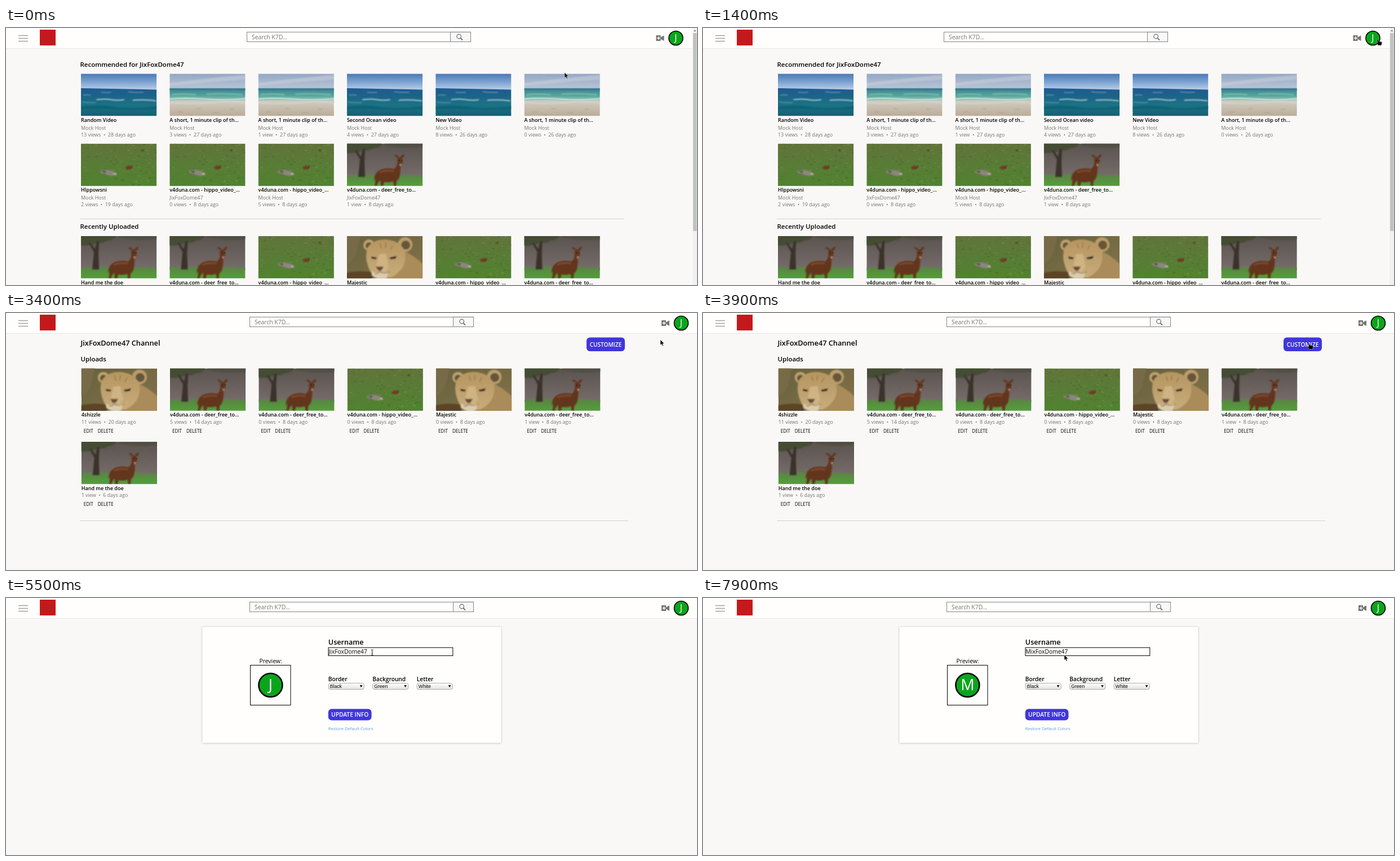
An HTML page for the animation above (8000 ms loop, 1226x457 px).

```html
<!DOCTYPE html>
<html lang="en">
<head>
<meta charset="utf-8">
<title>Video site account demo</title>
<style>
html, body { margin: 0; width: 100%; height: 100%; overflow: hidden; background: #f9f8f7; }
svg { display: block; }
text { font-family: "Open Sans", "Noto Sans", sans-serif; white-space: pre; }
.b { font-weight: 600; }
.m { text-anchor: middle; }
.g { fill: #747474; }
.sel { font-family: "Liberation Sans", Arial, sans-serif; }
.blur { filter: url(#blur); }
</style>
</head>
<body>
<svg id="stage" width="1226" height="457" viewBox="0 0 1226 457">
<defs>
  <linearGradient id="sky" x2="0" y2="1"><stop stop-color="#4a78b8"/><stop offset=".6" stop-color="#85a9d6"/><stop offset="1" stop-color="#b9cde4"/></linearGradient>
  <linearGradient id="sea" x2="0" y2="1"><stop stop-color="#1f5a93"/><stop offset=".25" stop-color="#1c6288"/><stop offset=".6" stop-color="#1c7285"/><stop offset="1" stop-color="#155f72"/></linearGradient>
  <linearGradient id="haze" x2="0" y2="1"><stop stop-color="#93a7c6"/><stop offset="1" stop-color="#bcc7d6"/></linearGradient>
  <linearGradient id="surf" x2="0" y2="1"><stop stop-color="#3d8390"/><stop offset=".5" stop-color="#4fa398"/><stop offset="1" stop-color="#a9cabd"/></linearGradient>
  <linearGradient id="sand" x2="0" y2="1"><stop stop-color="#d2cdc3"/><stop offset="1" stop-color="#bbac98"/></linearGradient>
  <linearGradient id="lawn" x2="0" y2="1"><stop stop-color="#61733a"/><stop offset=".5" stop-color="#587c36"/><stop offset="1" stop-color="#50832f"/></linearGradient>
  <linearGradient id="mist" x2="0" y2="1"><stop stop-color="#5a534e"/><stop offset="1" stop-color="#776d6c"/></linearGradient>
  <linearGradient id="turf" x2="0" y2="1"><stop stop-color="#5d8048"/><stop offset="1" stop-color="#52a038"/></linearGradient>
  <linearGradient id="scrub" x2="1" y2="1"><stop stop-color="#65613d"/><stop offset="1" stop-color="#84734b"/></linearGradient>
  <linearGradient id="fur" x2="0" y2="1"><stop stop-color="#b6955f"/><stop offset="1" stop-color="#c8ad7c"/></linearGradient>
  <linearGradient id="pick" x2="0" y2="1"><stop stop-color="#fff"/><stop offset="1" stop-color="#e2e2e2"/></linearGradient>
  <filter id="blur"><feGaussianBlur stdDeviation=".8"/></filter>
  <filter id="soft" x="-10%" y="-20%" width="120%" height="150%"><feDropShadow dx="0" dy="1" stdDeviation="1.6" flood-opacity=".4"/></filter>
  <filter id="glow" x="-5%" y="-5%" width="110%" height="112%"><feDropShadow dx="0" dy=".3" stdDeviation="1.4" flood-opacity=".35"/></filter>

  <symbol id="ocean" viewBox="0 0 134 75">
    <rect width="134" height="28" fill="url(#sky)"/>
    <path d="M0 25.5L134 28V75H0Z" fill="url(#sea)"/>
    <g class="blur">
      <path d="M-4 59q34-6 64 0t78-2v5q-40 3-78 1t-64 0Z" fill="#0d566b" opacity=".45"/>
      <g fill="none" stroke="#d3e4ea" stroke-linecap="round">
        <path d="M36 33q9 1 17 0M84 32q12 2 26 1M4 38q8-1 13 0" stroke-width=".9" opacity=".7"/>
        <path d="M28 46q14-2 26 0t22 0M92 47q18-2 40 1" stroke-width="1.5"/>
        <path d="M2 50q12 2 24 1" opacity=".5"/>
      </g>
    </g>
  </symbol>

  <symbol id="beach" viewBox="0 0 134 75">
    <rect width="134" height="28" fill="url(#haze)"/>
    <rect y="26" width="134" height="24" fill="url(#surf)"/>
    <path d="M0 48q30-2 64 0t70-1V75H0Z" fill="url(#sand)"/>
    <g class="blur">
      <path d="M-4 17q54-7 94-11t48-4v8q-64 4-142 12Z" fill="#cdd3dc" opacity=".5"/>
      <path d="M-4 27.5H138" stroke="#3b7391" stroke-width="2.5"/>
      <g fill="none" stroke="#e2ebe8" stroke-linecap="round">
        <path d="M4 37q20-2 42 0M66 36q28-2 62 1" opacity=".75"/>
        <path d="M-4 45q34-3 68 0t74-1" stroke-width="2"/>
        <path d="M-4 51q44 4 80 0t62 2" opacity=".7"/>
      </g>
      <path d="M14 68h9M48 62h7M76 69h11M106 63h8M34 73h6" stroke="#94866f" opacity=".6"/>
    </g>
  </symbol>

  <symbol id="hippo" viewBox="0 0 134 75">
    <rect width="134" height="75" fill="url(#lawn)"/>
    <g id="tufts"></g>
    <g class="blur">
      <path d="M34 49q6-4 14-2q10 1 15 6l-6 4q-10 0-15-4q-8 0-8-4Z" fill="#8d8580"/>
      <path d="M36 49q5-2 9 0l-2 3Z" fill="#5d4940"/>
      <path d="M56 54l6-2l1 4Z" fill="#c6bdb4"/>
      <path d="M78 42l6-3l6 2v4l-8 1Z" fill="#743820"/><path d="M88 39l3 0l-1 5Z" fill="#54291c"/>
      <path d="M106 12l4-2l1 4Z" fill="#52301d"/>
    </g>
  </symbol>

  <symbol id="deer" viewBox="0 0 134 75">
    <rect width="134" height="60" fill="url(#mist)"/>
    <path d="M0 55q60-3 134 1V75H0Z" fill="url(#turf)"/>
    <g class="blur">
      <path d="M-4-4h68q-4 12-17 12q-8 5-19 4q-14 7-32 4Z" fill="#414a31" opacity=".85"/>
      <path d="M66-4h72v9q-34 5-72-2Z" fill="#4c4e40" opacity=".7"/>
      <path d="M20 59l3-31l-9-16l3 0l8 11l3-14h4l-1 22l1 28Z" fill="#3a302a"/>
    </g>
    <path d="M48 66q0-15 12-20q12-4 23-1q5-3 6-10v-5q-1-4 2-5q-6-1-7-5q5-1 8 4l3 0q2-5 7-5q0 5-5 7q2 4 1 10q0 3-3 4q0 8-1 14q-1 9-6 12l-1 9h-4l-1-8q-8 3-16 1l-2 7h-4l-1-10q-4 3-6 10h-4q2-8 1-13Z" fill="#64351f" class="blur"/>
    <g class="blur">
      <path d="M58 51q12-5 25-2" stroke="#814a2e" stroke-width="3" fill="none"/>
      <path d="M93 35q3 2 5 0l-1 4q-2 2-4 0Z" fill="#a88672"/>
    </g>
    <path d="M92 29.5h1.4M97 29.5h1.4" stroke="#190d0a" stroke-width="1.4"/>
  </symbol>

  <symbol id="lion" viewBox="0 0 134 75">
    <rect width="134" height="75" fill="url(#scrub)"/>
    <g class="blur">
      <path d="M-4-4h29l-8 34q-8 18-21 22Z" fill="#776b46"/>
      <path d="M-4 66q24-6 49-2v15H-4Z" fill="#5b4526"/>
      <path d="M94 24q24 8 44 29v26H74Z" fill="#a98c5a"/>
      <circle cx="39" cy="16" r="10" fill="#c0a170"/><circle cx="39" cy="17" r="6" fill="#65543a"/>
      <circle cx="103" cy="15" r="13" fill="#bc9d6a"/><circle cx="104" cy="16" r="8" fill="#65543a"/>
      <path d="M37 20q10-14 30-14q26 1 35 20q5 25-12 39q-15 14-37 8q-12-6-16-21q-6-18 0-32Z" fill="url(#fur)"/>
      <path d="M57 32l12-1l5 24l-8 10l-12-1l-3-8Z" fill="#cfb382"/>
      <path d="M44 62q10 7 30 1l-4 12q-15 5-26-6Z" fill="#d9cbad"/>
      <path d="M51 54h14l-4 7h-6Z" fill="#6a4d3d"/>
      <path d="M43 36l10 2l-2 3l-7-1ZM75 38l13-3l-2 5l-9 1Z" fill="#3a2f20"/>
      <path d="M57 62q-2 7-8 4M58 62q8 7 18 1M59 13l2 9M69 12l-1 9M81 16l-4 8" stroke="#7c6440" fill="none"/>
    </g>
  </symbol>
</defs>
<rect width="1226" height="457" fill="#f9f8f7"/>
<g id="home"></g>
<g id="channel"></g>
<g id="settings"></g>
<g id="header"></g>
<g id="menu"></g>
<g id="bar">
  <rect x="1218" width="8" height="457" fill="#f1f1f1"/>
  <rect x="1219" y="9" width="6.5" height="352" fill="#c1c1c1"/>
  <path d="M1220 6l2.2-3l2.2 3Z" fill="#888"/>
</g>
<g id="cursor">
  <path id="arrow" d="M0 0V9.6L2.2 7.6L3.8 11.2L5.4 10.5L3.9 7.1H6.9Z" fill="#000" stroke="#fff" stroke-width=".5"/>
  <path id="hand" d="M0 0q1.3-.6 1.8.6l.8 3l5 .8q1.4.5 1 2l-1 4.6H2.3L-1.8 6.6q0-1.4 1.5-.7l1 .8Z" fill="#000" stroke="#fff" stroke-width=".4"/>
  <path id="beam" d="M-2-5q2 0 2 1q0-1 2-1M0-4V4M-2 5q2 0 2-1q0 1 2 1M-1 1.6h2" fill="none" stroke="#111" stroke-width=".9"/>
</g>
</svg>
<script>
const $ = id => document.getElementById(id);
const USER = "JixFoxDome47", HOST = "Mock Host";
const DEER = "v4duna.com - deer_free_to…", HIPPO = "v4duna.com - hippo_video_…", CLIP = "A short, 1 minute clip of th…";

const text = (x, y, size, str, cls = "", more = "") =>
  `<text x="${x}" y="${y}" font-size="${size}" class="${cls}" ${more}>${str}</text>`;
const rect = (x, y, w, h, fill, more = "") =>
  `<rect x="${x}" y="${y}" width="${w}" height="${h}" fill="${fill}" ${more}/>`;
const line = (x1, x2, y) => `<path d="M${x1} ${y}H${x2}" stroke="#d2d1d0"/>`;
const stats = (x, y, views, days) => text(x, y, 8.93,
  `${views} view${views === 1 ? "" : "s"}<tspan dx="4.6">•</tspan><tspan dx="4.6">${days} days ago</tspan>`, "g");
const button = (x, y, w, h, label, size) =>
  rect(x, y, w, h, "#4036dd", 'rx="6"') + text(x + w / 2, y + h / 2 + 3.8, size, label, "b m", 'fill="#fff"');
const avatar = (x, y, r, size, id = "") =>
  `<circle cx="${x}" cy="${y}" r="${r}" fill="#0ba51c" stroke="#000" stroke-width="${r / 9 + .2}"/>` +
  text(x, y + size * .32, size, "J", "m", `fill="#fff" id="${id}"`);

// One video tile; owner tiles carry edit links in place of the uploader.
function tile(x, y, [pic, title, user, views, days]) {
  let s = `<use href="#${pic}" x="${x}" y="${y}" width="134.3" height="75.3"/>` + text(x, y + 85.5, 9.03, title, "b");
  if (user) return s + text(x, y + 99.3, 8.93, user, "g") + stats(x, y + 111.8, views, days);
  if (days) s += stats(x, y + 98, views, days) +
    text(x + 4, y + 114, 8.05, "EDIT") + text(x + 29, y + 114, 8.05, "DELETE");
  return s;
}
const grid = (x, y, step, list) =>
  list.map((v, i) => tile(x + i % 6 * 157.3, y + (i / 6 | 0) * step, v)).join("");

let seed = 7;
const rnd = () => (seed = seed * 16807 % 2147483647) / 2147483647;
const greens = ["#74934a", "#4a6428", "#7c7a44", "#4e7f2f"];
let tufts = "";
for (let i = 0; i < 240; i++)
  tufts += `<ellipse cx="${(rnd() * 134).toFixed(1)}" cy="${(rnd() * 75).toFixed(1)}" rx="${(1 + rnd() * 2).toFixed(1)}" ry="${(.4 + rnd() * .8).toFixed(1)}" fill="${greens[i % 4]}" opacity=".5"/>`;
$("tufts").innerHTML = tufts;

$("home").innerHTML =
  text(131.5, 68.6, 11.5, "Recommended for " + USER, "b") +
  grid(133, 81.3, 124.3, [
    ["ocean", "Random Video", HOST, 13, 28], ["beach", CLIP, HOST, 3, 27], ["beach", CLIP, HOST, 1, 27],
    ["ocean", "Second Ocean video", HOST, 4, 27], ["ocean", "New Video", HOST, 8, 26], ["beach", CLIP, HOST, 0, 26],
    ["hippo", "HIppowsni", HOST, 2, 19], ["hippo", HIPPO, USER, 0, 8], ["hippo", HIPPO, HOST, 5, 8], ["deer", DEER, USER, 1, 8]
  ]) +
  line(131, 1096, 339.5) + text(131.5, 357.2, 11.5, "Recently Uploaded", "b") +
  grid(133, 370, 0, [["deer", "Hand me the doe"], ["deer", DEER], ["hippo", HIPPO], ["lion", "Majestic"], ["hippo", HIPPO], ["deer", DEER]]);

$("channel").innerHTML =
  text(132.5, 58.3, 12.75, USER + " Channel", "b") + text(132.5, 85.8, 11.5, "Uploads", "b") +
  button(1030, 43.5, 68, 24.5, "CUSTOMIZE", 10.1) +
  grid(133.7, 98.6, 130.5, [
    ["lion", "4shizzle", "", 11, 20], ["deer", DEER, "", 5, 14], ["deer", DEER, "", 0, 8], ["hippo", HIPPO, "", 0, 8],
    ["lion", "Majestic", "", 0, 8], ["deer", DEER, "", 1, 8], ["deer", "Hand me the doe", "", 1, 6]
  ]) + line(131, 1104, 369.5);

const picker = (x, label, value) => text(x, 148, 10.2, label, "b") +
  rect(x + .4, 151.5, 63, 11, "url(#pick)", 'rx="3" stroke="#999" stroke-width=".8"') +
  text(x + 3, 160, 8.6, value, "sel") + `<path d="M${x + 56} 155h4.6l-2.3 4Z"/>`;

$("settings").innerHTML =
  rect(348.5, 51.5, 530, 206, "#fffefd", 'filter="url(#glow)"') +
  text(469.5, 116, 10.4, "Preview:", "m") +
  rect(433.5, 119.5, 71.5, 71, "#fffefd", 'stroke="#000"') + avatar(469.4, 155, 21, 27, "letter") +
  text(571.8, 83.4, 12.6, "Username", "b") +
  rect(572, 88.2, 220.8, 14.4, "#fffefd", 'stroke="#000"') + text(572.5, 99.4, 10.3, USER, "", 'id="name"') +
  picker(571.8, "Border", "Black") + picker(650.3, "Background", "Green") + picker(728.8, "Letter", "White") +
  button(571.8, 197.3, 76.7, 20.2, "UPDATE INFO", 10.25) +
  text(571.8, 235.4, 7.63, "Restore Default Colors", "", 'fill="#5c9bdc"') +
  `<g id="hint">${rect(572, 103.5, 220.5, 36, "#fff", 'stroke="#bbb" stroke-width=".8"') + text(576, 125, 10.3, USER)}</g>` +
  `<path id="caret" d="M0 90V101" stroke="#000" stroke-width=".9"/>`;

$("header").innerHTML =
  rect(0, 0, 1226, 36, "#fffefd") + rect(0, 36, 1226, 1, "#e9e8e7") +
  '<path d="M22 13.5H39M22 18.5H39M22 23.5H39" stroke="#a3a3a3" stroke-width="1.3"/>' +
  rect(60, 3, 28, 28, "#c4191c") +
  `<g id="search">${rect(427.5, 7.3, 397, 17.2, "#fffefd", 'stroke="#858585"')}${rect(788.5, 7.3, 36, 17.2, "#f8f8f8", 'stroke="#858585"')}
  ${text(436, 19.8, 10.4, "Search K7D...", "", 'fill="#757575"')}
  <g fill="none" stroke="#666" stroke-width="1.2"><circle cx="803.6" cy="15" r="3.8"/><path d="M806.4 17.8L810 21.6" stroke-width="1.7"/></g></g>` +
  `<g id="right"><path d="M1153.5 13H1161.5V16.6L1167.5 13.2V23L1161.5 19.6V23H1153.5Z" fill="#747474"/>
  <path d="M1155 18H1161M1158 15V21" stroke="#fff" stroke-width="1.3"/>${avatar(1188.5, 18, 12.5, 16)}</g>`;

$("menu").innerHTML =
  rect(1103, 31, 92.5, 50.3, "#fffefd", 'filter="url(#soft)"') + rect(1103, 40, 92.5, 20.7, "#cfcecd", 'id="hover"') +
  rect(1106.5, 44, 12.5, 12, "#666", 'rx="1.5"') +
  '<circle cx="1112.8" cy="48" r="2" fill="#fff"/><path d="M1108.8 54q0-3 4-3t4 3Z" fill="#fff"/>' +
  rect(1107, 65, 11.6, 11.6, "none", 'rx="1" stroke="#666" stroke-width="1.2"') +
  '<path d="M1106 70.8H1115M1112.4 68L1115.2 70.8L1112.4 73.6" fill="none" stroke="#555" stroke-width="1.2"/>' +
  text(1126, 54.3, 10.25, "Your Account", "b") + text(1126, 74.9, 10.25, "Log Out", "b");

// Pointer: time, x, y, shape
const moves = [
  [0, 991, 79, "arrow"], [500, 976, 110, "arrow"], [600, 1042, 145, "arrow"], [700, 1121, 86, "arrow"],
  [900, 1146, 69, "arrow"], [1000, 1164, 54, "arrow"], [1200, 1181.5, 34, "hand"], [1400, 1196, 20, "hand"],
  [2400, 1181, 41.5, "hand"], [2800, 1160, 46.5, "hand"], [3400, 1161, 47.5, "arrow"],
  [3600, 1133, 53, "arrow"], [3700, 1071, 57, "hand"], [3800, 1037, 57, "hand"], [3900, 1074, 53.5, "hand"],
  [4500, 1074.5, 53.5, "arrow"], [4800, 1010, 59, "arrow"], [4900, 878, 73, "arrow"], [5000, 781, 80, "arrow"],
  [5300, 735, 87, "arrow"], [5400, 683, 95, "beam"], [5500, 649.7, 96.8, "beam"], [7900, 641, 101, "arrow"]
];

const show = (id, on) => $(id).setAttribute("display", on ? "inline" : "none");
const shift = (id, x, y = 0) => $(id).setAttribute("transform", `translate(${x} ${y})`);

function render(t) {
  const first = t < 3400;
  show("home", first);
  show("bar", first);
  show("channel", !first && t < 4500);
  show("settings", t >= 4500);
  shift("search", first ? 0 : 5);
  shift("right", first ? 0 : 9.5);
  show("menu", t >= 2000 && first);
  show("hover", t >= 2400);

  const typed = t >= 7200, cut = t >= 7000;
  $("name").textContent = (typed ? "M" : cut ? "" : "J") + USER.slice(1);
  $("letter").textContent = typed ? "M" : cut ? USER[1] : "J";
  show("hint", t >= 5800 && !cut);
  show("caret", t >= 5800 && t < 7900);
  shift("caret", typed ? 581.9 : t >= 6400 ? 573 : 641);

  const [, x, y, kind] = moves.filter(m => m[0] <= t).pop();
  shift("cursor", x, y);
  for (const k of ["arrow", "hand", "beam"]) show(k, k === kind);
}

function tick() {
  render(performance.now() % 8000);
  requestAnimationFrame(tick);
}
tick();
</script>
</body>
</html>
```
